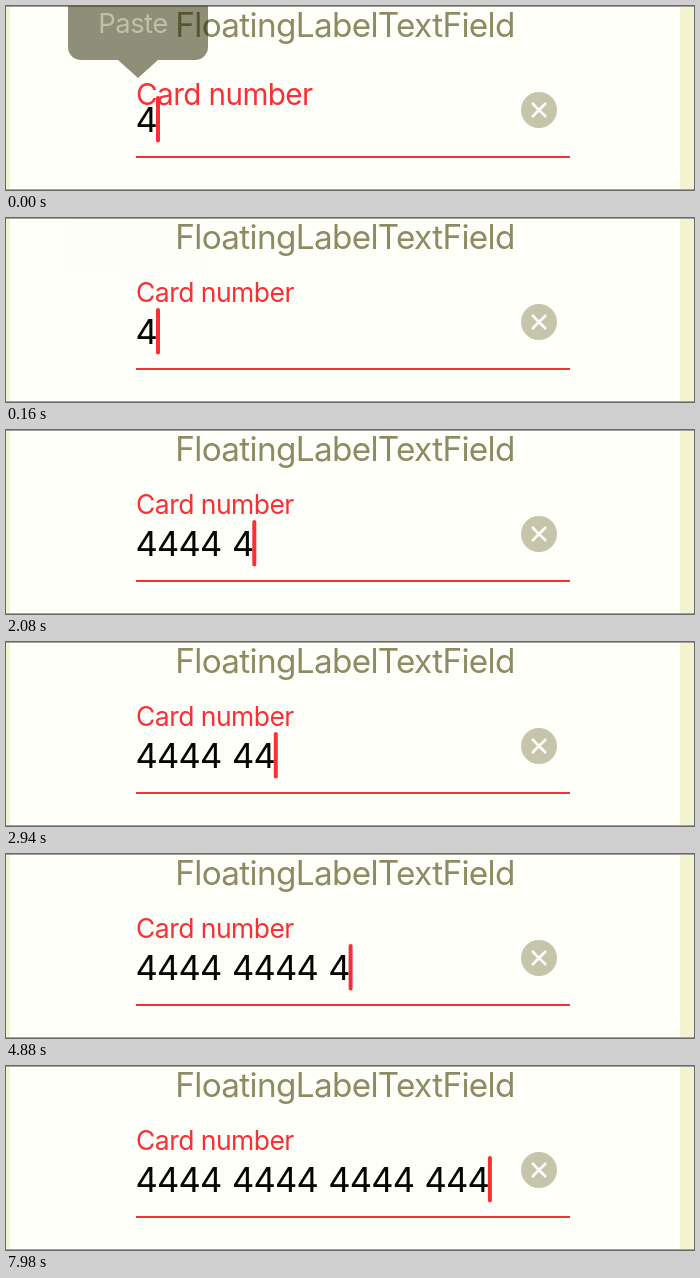
These frames come from a looping animation (688x184 px, 8 s). An HTML page with a canvas:

```html
<!DOCTYPE html>
<html lang="en">
<head>
<meta charset="utf-8">
<title>FloatingLabelTextField</title>
<style>
  html, body { margin: 0; width: 100%; height: 100%; overflow: hidden; background: #fffffa; }
  canvas { display: block; }
</style>
</head>
<body>
<canvas id="stage" width="688" height="184"></canvas>
<script>
const ctx = document.getElementById('stage').getContext('2d');
const LOOP = 8000;
const RED = '#f82f34';
const FIELD_X = 130;
const DIGIT_WIDTH = 21.5;
const SPACE_WIDTH = 10.3;
const TRACKING = -0.02;
const keyTimes = [0, 560, 1000, 1440, 1860, 2320, 3940, 4340, 4880, 5200, 5520, 5860, 6700, 7300, 7820];

function rect(x, y, w, h, color) {
  ctx.fillStyle = color;
  ctx.fillRect(x, y, w, h);
}

function text(str, x, y, size, color, align = 'left') {
  ctx.font = `400 ${size}px Inter, Roboto, sans-serif`;
  ctx.letterSpacing = `${size * TRACKING}px`;
  ctx.textAlign = align;
  ctx.fillStyle = color;
  ctx.fillText(str, x, y);
}

function drawBackground() {
  rect(0, 0, 688, 184, '#fffffa');
  rect(0, 0, 4, 184, '#f3f3d0');
  rect(674, 0, 14, 184, '#f3f3d0');
  rect(0, 0, 688, 1, '#a3a39c');
  rect(0, 183, 688, 1, '#a3a39c');
}

function drawClearButton() {
  ctx.fillStyle = '#c6c5ab';
  ctx.beginPath();
  ctx.arc(533, 104, 18, 0, Math.PI * 2);
  ctx.fill();
  ctx.strokeStyle = '#fffffa';
  ctx.lineWidth = 2.5;
  ctx.beginPath();
  for (const side of [-1, 1]) {
    ctx.moveTo(533 - 7 * side, 97);
    ctx.lineTo(533 + 7 * side, 111);
  }
  ctx.stroke();
}

function drawNumber(count) {
  let x = FIELD_X;
  for (let i = 0; i < count; i++) {
    if (i && i % 4 === 0) x += SPACE_WIDTH;
    text('4', x - 0.4, 126, 34.5, '#050500');
    x += DIGIT_WIDTH;
  }
  ctx.fillStyle = RED;
  ctx.beginPath();
  ctx.roundRect(x - 1.5, 90, 4, 46.5, 2);
  ctx.fill();
}

function drawPasteMenu(alpha) {
  ctx.save();
  ctx.globalAlpha = alpha;
  ctx.fillStyle = '#232300';
  ctx.beginPath();
  ctx.roundRect(62, -30, 140, 84, 13);
  ctx.moveTo(112, 54);
  ctx.lineTo(132, 72);
  ctx.lineTo(152, 54);
  ctx.fill();
  text('Paste', 127, 27, 27.4, '#f0f0d0', 'center');
  ctx.restore();
}

function draw(t) {
  // Remaining part of the opening transition, easing out to zero.
  const rest = Math.max(0, 1 - t / 180) ** 2;

  drawBackground();
  text('FloatingLabelTextField', 339, 31, 33.3, '#8d8b62', 'center');
  rect(FIELD_X, 150, 434, 2, RED);
  drawClearButton();
  drawNumber(keyTimes.filter(time => time <= t).length);
  text('Card number', FIELD_X, 84 + 15 * rest, 26.5 + 3.2 * rest, RED);
  if (rest) drawPasteMenu(0.52 * rest);
}

function tick() {
  draw(performance.now() % LOOP);
  requestAnimationFrame(tick);
}
tick();
</script>
</body>
</html>
```
